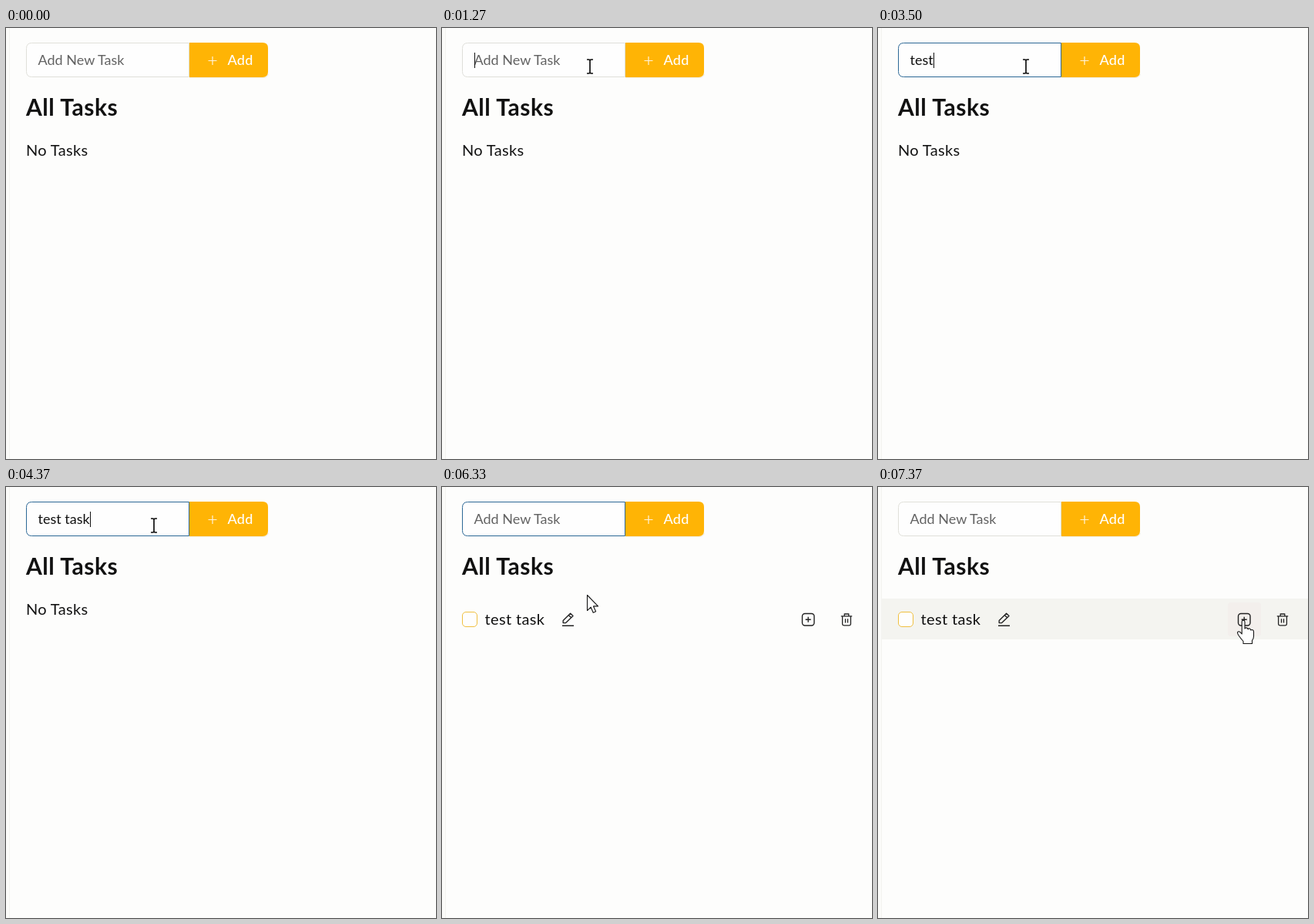
Animation of 558 by 560 pixels, one loop 8 s. Source, as an HTML page:

```html
<!DOCTYPE html>
<html lang="en">
<head>
<meta charset="utf-8">
<title>Task list</title>
<style>
  html, body { margin: 0; width: 100%; height: 100%; overflow: hidden; background: #fdfdfc; }
  svg { display: block; width: 558px; height: 560px; }
  text { font-family: Lato, "Open Sans", sans-serif; font-size: 18px; fill: #111; white-space: pre; }
  .big { font-size: 20px; letter-spacing: .35px; }
  .icon { fill: none; stroke: #222; stroke-width: 1.4; stroke-linejoin: round; }
  .cursor { fill: #fff; stroke: #161616; stroke-width: 1.1; stroke-linejoin: round; }
</style>
</head>
<body>
<svg viewBox="0 0 558 560">
  <rect width="558" height="560" fill="#fdfdfc"/>
  <rect width="5" height="560" fill="#fbfbf9"/>
  <rect x="4" width="1" height="560" fill="#f3f3f0"/>

  <rect id="hover" x="5" y="145" width="553" height="53" fill="#f4f4f0"/>
  <rect id="tile" x="454" y="150" width="43" height="44" rx="4" fill="#f3efec"/>

  <path d="M238 64.5H334Q339 64.5 340.5 60" fill="none" stroke="#f0ece0"/>
  <path d="M238 19H333Q340 19 340 26V57Q340 64 333 64H238Z" fill="#ffb405"/>
  <path d="M262.5 42.5H273.5M268 37V48" stroke="#fff3dc" stroke-width="1.2"/>
  <text x="287.5" y="48" style="fill:#fff;font-weight:500;letter-spacing:.3px">Add</text>
  <path id="field" d="M237.5 19.5H33.5Q26.5 19.5 26.5 26.5V56.5Q26.5 63.5 33.5 63.5H237.5Z" fill="#fefefe"/>
  <text id="hint" x="41.5" y="48" style="fill:#626262">Add New Task</text>
  <text id="typed" x="41.5" y="48"></text>
  <rect id="caret" y="32" width="1" height="20" fill="#111"/>

  <text x="26" y="114" style="font-size:30px;font-weight:700;letter-spacing:.55px">All Tasks</text>
  <text id="empty" class="big" x="26" y="166">No Tasks</text>

  <g id="row">
    <rect x="26.5" y="162.5" width="19" height="19" rx="4.5" fill="#fefefe" stroke="#f0c040"/>
    <text class="big" x="55.5" y="179">test task</text>
    <g class="icon">
      <path d="M156 180.2H171M157.2 176.6V173.4L166.6 164.2L170 167.5L160.6 176.6ZM164.3 166.4L167.7 169.8"/>
      <rect x="467.5" y="164.5" width="15.5" height="15.5" rx="3.5"/>
      <path d="M475.2 168.8V175.8M471.7 172.3H478.7"/>
      <path stroke-width="1.3" d="M517.8 167.8H532.2M519.6 168V178Q519.6 179.8 521.4 179.8H528.6Q530.4 179.8 530.4 178V168M522.2 167.6V165H527.8V167.6M523.5 171.2V176.4M526.5 171.2V176.4"/>
    </g>
  </g>

  <path id="arrow" class="cursor" d="M.5 .5V20.5L5.2 16.2L8.2 23.2L11.6 21.8L8.5 14.9H14.5Z"/>
  <path id="beam" d="M-4 -9H-1.2L0 -8L1.2 -9H4M0 -8V8M-4 9H-1.2L0 8L1.2 9H4" fill="none" stroke="#111" stroke-width="1.7"/>
  <path id="hand" class="cursor" d="M-1.8 1Q-1.8 -.8 0 -.8T2 1V10Q2.6 8.6 4.2 8.9T6 10.8Q7 9.5 8.4 10T9.8 12Q11 11 12.3 11.8T13.5 14V20Q13.5 23 11.5 25.4V29.5H0V26.5Q-3.5 22.5 -6.4 18.2Q-8.4 15 -6.7 14T-1.8 17Z"/>
</svg>
<script>
const LOOP = 8000;
const ids = ["hover", "tile", "field", "hint", "typed", "caret", "empty", "row", "arrow", "beam", "hand"];
const el = Object.fromEntries(ids.map(id => [id, document.getElementById(id)]));

// time, x, y of the pointer's hot spot
const path = [
  [30, 352, 562], [250, 300, 270], [470, 248, 108], [650, 215, 70],
  [830, 190, 44], [970, 192, 50], [5930, 192, 50], [6130, 189, 86],
  [6330, 187, 140], [6530, 300, 180], [6730, 442, 184], [7000, 474, 174]
];
// time, text in the field
const typing = [
  [0, ""], [2330, "t"], [2630, "te"], [2670, "test"], [3770, "test "],
  [3820, "test t"], [3870, "test ta"], [4130, "test tas"], [4370, "test task"], [5200, ""]
];
// the caret toggles at each of these times
const blinks = [1270, 1800, 2330, 3070, 3500, 4900, 5430, 5960, 6490, 7020];

const ramp = (t, a, b) => Math.min(1, Math.max(0, (t - a) / (b - a)));
const show = (node, on) => node.setAttribute("visibility", on ? "visible" : "hidden");
const mix = (a, b, k) => `rgb(${a.map((v, i) => Math.round(v + (b[i] - v) * k))})`;

function pointer(t) {
  const i = path.findIndex(p => p[0] > t);
  if (i === 0) return path[0].slice(1);
  if (i < 0) return path[path.length - 1].slice(1);
  const a = path[i - 1], b = path[i], k = ramp(t, a[0], b[0]);
  return [1, 2].map(n => a[n] + (b[n] - a[n]) * k);
}

function draw(t) {
  const text = typing.filter(s => s[0] <= t).pop()[1];
  el.typed.textContent = text;
  show(el.hint, !text);

  const focus = ramp(t, 1270, 1430) - ramp(t, 7200, 7370);
  el.field.setAttribute("stroke", mix([224, 224, 218], [44, 104, 150], focus));
  show(el.caret, blinks.filter(b => b <= t).length % 2);
  el.caret.setAttribute("x", Math.round(41.5 + (text ? el.typed.getComputedTextLength() : 0)));

  show(el.empty, t < 5200);
  el.row.setAttribute("opacity", ramp(t, 5200, 5400));

  const [x, y] = pointer(t);
  const inField = x < 238 && y > 19 && y < 64;
  const inRow = t > 6000 && y > 145;
  const onAdd = inRow && x > 454;
  el.hover.setAttribute("opacity", inRow ? ramp(t, 6340, 6490) : 0);
  el.tile.setAttribute("opacity", onAdd ? ramp(t, 6800, 6950) : 0);

  const kind = inField ? "beam" : onAdd ? "hand" : "arrow";
  for (const name of ["arrow", "beam", "hand"]) {
    show(el[name], name === kind && t >= 30);
    el[name].setAttribute("transform", `translate(${Math.round(x)} ${Math.round(y)})`);
  }
}

const start = performance.now();
function tick() {
  draw((performance.now() - start) % LOOP);
  requestAnimationFrame(tick);
}
draw(0);
requestAnimationFrame(tick);
</script>
</body>
</html>
```
